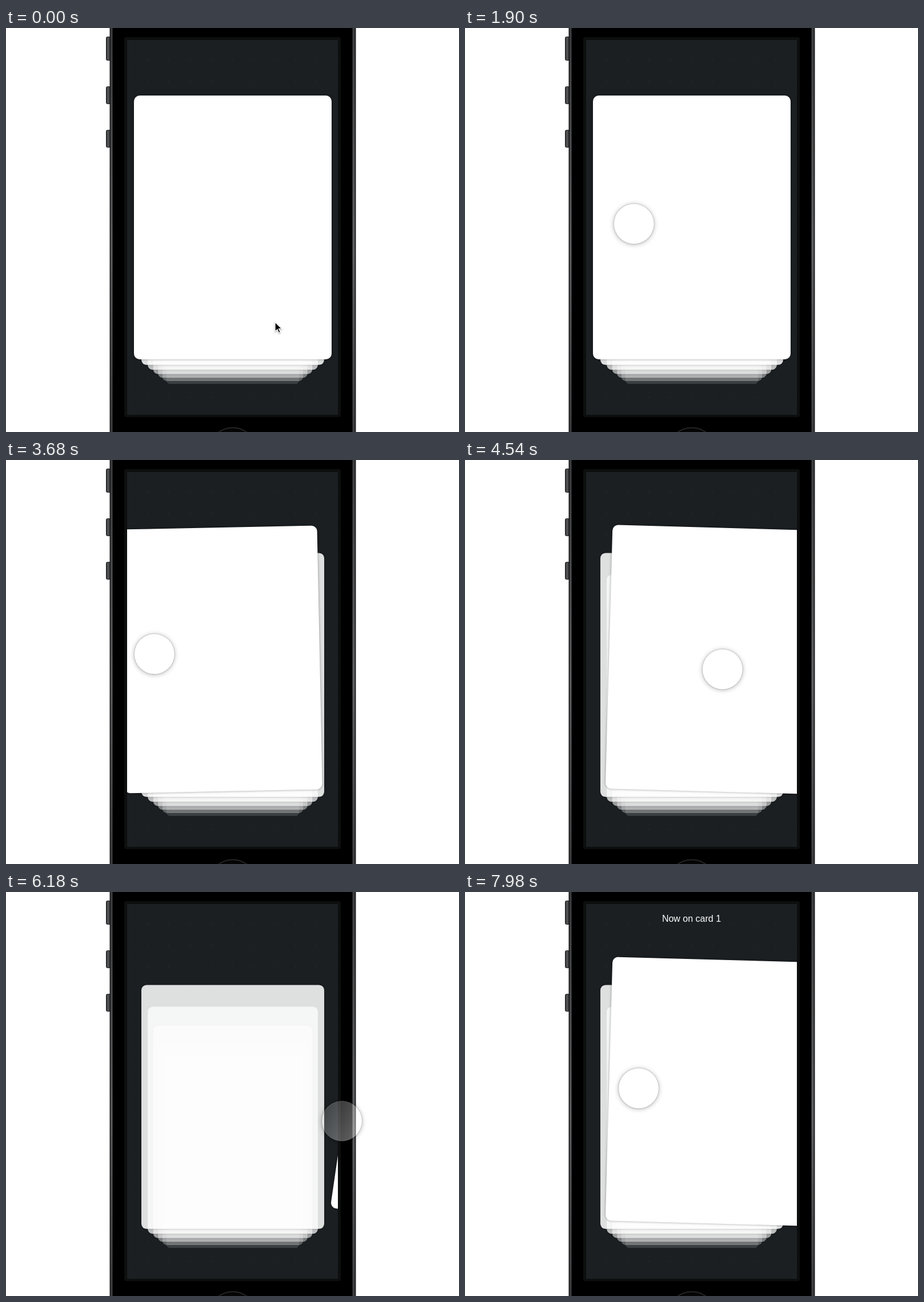
These frames come from a looping animation (793 px wide and 706 px high, 8000 ms). An HTML page:

```html
<!DOCTYPE html>
<html lang="en">
<head>
<meta charset="utf-8">
<title>Card stack</title>
<style>
  html, body { margin: 0; width: 100%; height: 100%; overflow: hidden; background: #fff; }
  #stage { position: relative; width: 793px; height: 706px; overflow: hidden; }
  #stage > svg, #stage > div, #screen > * { position: absolute; }
  #screen {
    left: 212px; top: 21px; width: 369px; height: 655px; overflow: hidden; isolation: isolate;
    background: radial-gradient(circle at 18.5px 18.5px, #2a2e31 0.8px, transparent 1.1px) 17.5px 17px / 37px 36.8px, #1b1f22;
  }
  .card {
    left: 11.5px; top: 96.5px; width: 346px; height: 461px; border-radius: 10px;
    background: #fff; box-shadow: 0 0 4px rgba(0, 0, 0, .38);
  }
  #label {
    left: 0; right: 0; top: 16px; text-align: center; color: #fff;
    font: 16px/20px "Liberation Sans", Arial, sans-serif;
  }
  #touch {
    left: -35px; top: -35px; width: 70px; height: 70px; border-radius: 50%;
    background: linear-gradient(115deg, rgba(255, 255, 255, .14), rgba(255, 255, 255, .42));
    box-shadow: 0 0 2px rgba(0, 0, 0, .4), 0 1px 9px rgba(0, 0, 0, .3), inset 0 0 1px rgba(255, 255, 255, .6);
  }
</style>
</head>
<body>
<div id="stage">
  <svg width="793" height="706">
    <defs>
      <linearGradient id="metal" x2="0" y2="1">
        <stop offset="0" stop-color="#3c3d3f"/><stop offset=".55" stop-color="#606163"/>
        <stop offset="1" stop-color="#3c3d3f"/>
      </linearGradient>
      <linearGradient id="key">
        <stop offset="0" stop-color="#2a2a2b"/><stop offset=".35" stop-color="#5a5b5d"/>
        <stop offset="1" stop-color="#161617"/>
      </linearGradient>
    </defs>
    <g fill="url(#key)" stroke="#1b1b1c">
      <rect x="175.5" y="15.5" width="9" height="41" rx="2"/>
      <rect x="175.5" y="102.5" width="9" height="30" rx="2"/>
      <rect x="175.5" y="178.5" width="9" height="30" rx="2"/>
    </g>
    <rect x="181.5" width="431" height="706" fill="#1d1d1e"/>
    <rect x="183.5" width="427" height="706" fill="url(#metal)"/>
    <rect x="186.5" width="420" height="706"/>
    <rect x="207" y="16" width="379" height="664" rx="4" fill="#0d0e0e"/>
    <circle cx="397" cy="741" r="42.5" fill="#050505" stroke="#2c2c2d" stroke-width="1.5"/>
  </svg>
  <div id="screen"><div id="label">Now on card 1</div></div>
  <svg id="arrow" width="30" height="34" style="left:468px;top:511px;filter:drop-shadow(0 1px 1px rgba(0,0,0,.4))">
    <path d="M3 3V19.5L6.9 15.8L9.6 21.8L12.3 20.6L9.7 14.7H15Z" stroke="#fff" stroke-width="1.3"/>
  </svg>
  <div id="touch"></div>
</div>
<script>
const LOOP = 8000;

// Turning points of the finger and of the first card: [time, x].
const FINGER = [[500, 471], [1850, 292], [2400, 445], [3100, 185], [4845, 474], [5580, 421], [6180, 588], [7300, 234], [7980, 304]];
const DRAG = [[1900, 0], [2400, 60], [3100, -40], [4845, 34], [5580, 52.5], [6400, 444]];

function ease(from, to, t) {
  const u = Math.min(1, Math.max(0, (t - from) / (to - from)));
  return u * u * (3 - 2 * u);
}

const along = (points, t) => points.slice(1).reduce(
  (x, [time, target], i) => x + (target - points[i][1]) * ease(points[i][0], time, t),
  points[0][1]);

const byId = id => document.getElementById(id);
const screenBox = byId("screen"), label = byId("label"), arrow = byId("arrow"), touch = byId("touch");
const cards = Array.from({ length: 8 }, () => {
  const card = document.createElement("div");
  card.className = "card";
  screenBox.prepend(card);
  return card;
});

const show = (element, visible) => { element.style.visibility = visible ? "visible" : "hidden"; };

function placeCard(card, depth, dx) {
  const scale = 1 / (1 + .081 * depth);
  const dy = (132 - 230) * (scale - 1) * -1 + 0;
  const lift = (132 + 230) * (1 - scale);
  const angle = Math.min(8.3, dx * .056);
  card.style.transform = `translate(${dx}px, ${lift}px) rotate(${angle}deg) scale(${scale})`;
  card.style.opacity = Math.max(0, 1 - depth / 7);
}

function draw(t) {
  const advance = ease(6320, 6720, t);
  const drags = [along(DRAG, t), 28 * ease(7300, 7980, t)];
  cards.forEach((card, i) => placeCard(card, Math.max(0, i - advance), drags[i] || 0));

  const x = along(FINGER, t);
  const y = 335 + .00034 * (x - 150) ** 2 + 144 * (1 - ease(500, 1850, t));
  touch.style.transform = `translate(${x}px, ${y}px)`;
  show(touch, t >= 400);
  show(arrow, t < 400);
  show(label, t >= 6600);
}

const start = performance.now();
function tick() {
  draw((performance.now() - start) % LOOP);
  requestAnimationFrame(tick);
}
tick();
</script>
</body>
</html>
```
